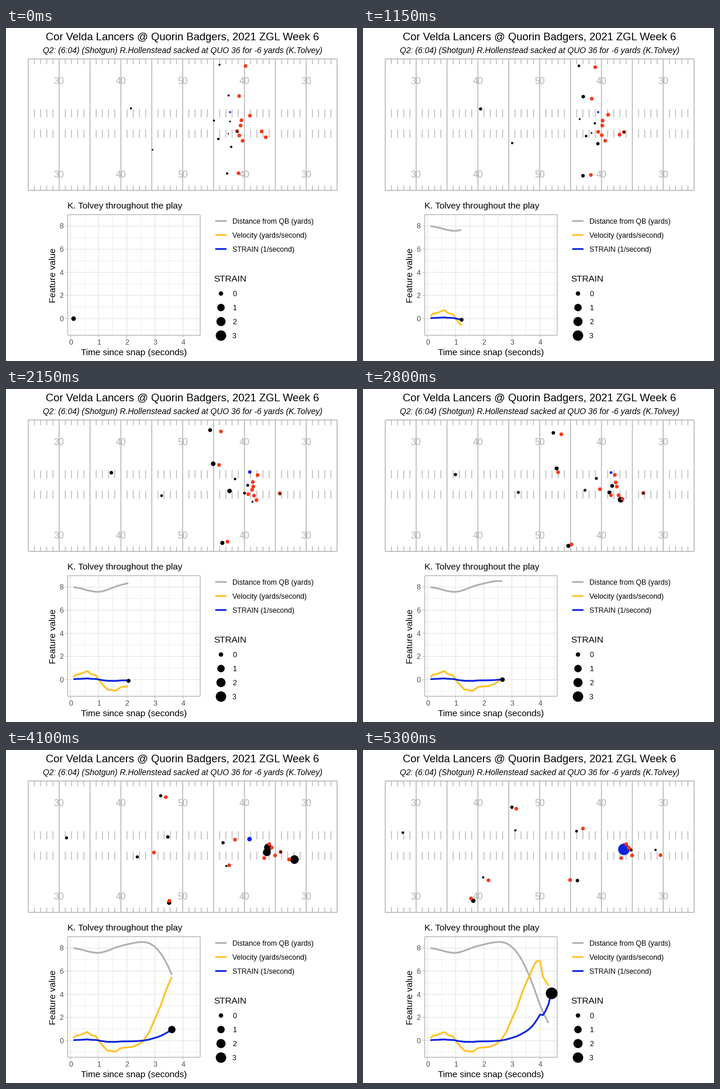
Write a matplotlib script that moves like this. It is 600 by 570 pixels and loops after 6 s.

```python
import numpy as np
import matplotlib.pyplot as plt
from matplotlib.animation import FuncAnimation

DPI, W, H = 100, 600, 570
GRAY, GOLD, BLUE, ORANGE, BALL = "#b3b3b3", "#ffc125", "#0b24dc", "#fa3616", "#2e1c14"
GRID, AXIS_TEXT = "#dedede", "#4d4d4d"
STEPS, LAST = 64, 43
FRAMES, INTERVAL = 120, 50
START, END = 0.1, 4.4

plt.rcParams["font.family"] = "Liberation Sans"

fig = plt.figure(figsize=(W / DPI, H / DPI), dpi=DPI, facecolor="white")
ax = fig.add_axes([0, 0, 1, 1])
ax.set_xlim(0, W)
ax.set_ylim(H, 0)
ax.axis("off")


def pt(px):
    return px * 72 / DPI


def area(r):
    return pt(2 * np.asarray(r, float)) ** 2


def label(x, y, s, size, ha="left", color="black", **kw):
    ax.text(x, y, s, fontsize=size, ha=ha, va="baseline", color=color, **kw)


def vlines(xs, y0, y1, px=1.48, color=GRAY):
    ax.vlines(xs, y0, y1, colors=color, lw=pt(px), zorder=1, snap=False)


def hlines(ys, x0, x1, px=1.48, color=GRAY):
    ax.hlines(ys, x0, x1, colors=color, lw=pt(px), zorder=1, snap=False)


# --- timing: 0.1 s states spread over whole steps, shown at a slowing pace ---
steps = np.arange(STEPS + 1)
ticks = np.where(steps <= 43, np.maximum((3 * steps - 1) // 2, 0), 2 * steps - 22)
times = START + 0.1 * np.arange(LAST + 1)
state_step = np.rint(np.arange(LAST + 1) * STEPS / LAST)


def play_time(frame):
    step = np.searchsorted(ticks, frame, side="right") - 1
    return float(np.interp(step, state_step, times))


# --- movement ---------------------------------------------------------------
KEYS = np.array([START, 1.2, 2.65, 4.0, END])


def route(*points):
    """Cubic Hermite curve through the points at KEYS, with a slow start."""
    p = np.array(points, float)
    m = np.gradient(p, KEYS, axis=0)
    m[0] *= 0.3

    def at(t):
        i = int(np.clip(np.searchsorted(KEYS, t) - 1, 0, len(KEYS) - 2))
        h = KEYS[i + 1] - KEYS[i]
        u = (t - KEYS[i]) / h
        s = u * u * (3 - 2 * u)
        return (p[i] + (p[i + 1] - p[i]) * s
                + h * u * (1 - u) * ((1 - u) * m[i] - u * m[i + 1]))
    return at


def cover(man, first, last, power=1):
    """Stay near a man while the gap to him closes."""
    first, last = np.array(first), np.array(last)

    def at(t):
        k = np.clip((END - t) / (END - START), 0, 1) ** power
        return man(t) - last - (first - last) * k
    return at


drift = route(0, 0.15, 0.62, 1.06, 1)


def block(first, last):
    first, last = np.array(first), np.array(last)
    return lambda t: first + (last - first) * drift(t)


wide_top = route((409.5, 65), (397, 67), (339, 77.5), (259, 87.5), (262, 100.5))
slot = route((398.5, 116.5), (391, 121), (333.5, 142.5), (227, 196.5), (214.5, 223))
wide_low = route((397.5, 248.5), (389.5, 251.5), (356.5, 266), (235, 255), (184.5, 254))
tight_end = route((417, 150), (419, 148.5), (430.5, 147), (379, 148.5), (376, 134.5))
runner = route((444, 187), (438.5, 182.5), (405, 171.5), (369, 210.5), (354, 222.5))
passer = route((437, 177), (446, 178), (479, 178), (463, 172.5), (457.5, 170.5))
left_tackle = block((402.5, 158), (450, 161))
left_guard = block((401, 167), (454, 167))
center = block((395, 176.5), (441.5, 185))
right_guard = block((399, 184), (460, 180.5))
right_tackle = route((404.5, 193), (414, 193), (443.5, 188), (498.5, 185), (508.5, 180))
offense = [wide_top, slot, wide_low, tight_end, runner, left_tackle, left_guard,
           center, right_guard, right_tackle, passer]

rusher = route((383, 144), (402, 144), (424, 143), (424, 160), (446, 170))
defense = [
    cover(wide_top, (44.5, 2), (7.5, 2.5), 2),
    cover(wide_low, (19.5, -0.5), (-4, -4)),
    cover(tight_end, (61.5, -8.5), (11, -4.5)),
    cover(runner, (81, -3), (-12.5, -1)),
    cover(left_guard, (18, 7), (6, 0), 2),
    cover(right_guard, (19, 3), (13, 6)),
    route((380.5, 115.5), (376.5, 117.5), (331, 136), (262.5, 147), (260.5, 137.5)),
    route((213.5, 137.5), (201, 138.5), (158, 146.5), (83, 148), (68, 141.5)),
    route((250.5, 208.5), (255, 197), (265.5, 177), (210.5, 196), (205.5, 218)),
    route((385, 203.5), (401.5, 198), (440.5, 189.5), (504, 182), (500, 171)),
    rusher,
]


def ball_path(t):
    snap = center(START)
    return snap + (passer(t) - snap) * min((t - START) / 0.6, 1)


def pressure(man, t, dt=0.05):
    """Speed of change of the distance to the passer, relative to it."""
    now, before = (np.hypot(*(man(s) - passer(s))) for s in (t, t - dt))
    return abs(before - now) / dt / max(now, 1)


def field_radius(v):
    return 1.13 + 8.74 * np.sqrt(min(v / 4, 1))


# --- features of the rusher -------------------------------------------------
velocity = np.interp(times, *zip(
    (0.1, 0.2), (0.2, 0.43), (0.3, 0.45), (0.6, 0.74), (0.7, 0.5), (0.9, 0.36),
    (1.1, -0.33), (1.3, -0.86), (1.6, -0.97), (1.8, -0.64), (2.2, -0.55), (2.4, -0.36),
    (2.6, 0), (2.8, 0.75), (3.2, 3.0), (3.4, 4.4), (3.8, 6.6), (3.9, 6.9), (4.0, 6.87),
    (4.1, 5.5), (4.4, 4.4)))
distance = 8 - 0.1 * (np.cumsum(velocity) - velocity[0])
strain = velocity / distance


def px(t):
    return 110.5 + 48.05 * np.asarray(t)


def py(v):
    return 497.3 - 19.78 * np.asarray(v)


def strain_radius(v):
    return 2.46 + 7.4 * np.sqrt(max(v + 0.13, 0) / 4.1)


# --- field ------------------------------------------------------------------
label(301.5, 21.3, "Cor Velda Lancers @ Quorin Badgers, 2021 ZGL Week 6", 13.2, "center")
label(302, 43, "Q2: (6:04) (Shotgun) R.Hollenstead sacked at QUO 36 for -6 yards (K.Tolvey)",
      10, "center", style="italic")

LEFT, RIGHT, TOP, BOTTOM = 38, 566, 53, 278
yards = np.linspace(LEFT, RIGHT, 51)
inner = [x for i, x in enumerate(yards) if i % 5]
for y0, y1 in [(TOP, 62), (139, 153), (174, 188), (269.5, BOTTOM)]:
    vlines(inner, y0, y1, 1.3)
vlines(yards[::5], TOP, BOTTOM)
hlines([TOP, BOTTOM], LEFT, RIGHT)
for x, yard in zip(yards[5::10], (30, 40, 50, 40, 30)):
    for y in (96.2, 256.5):
        label(x, y, yard, 11.4, "center", GRAY)

# --- feature chart ----------------------------------------------------------
X0, X1, Y0, Y1 = 105.5, 332, 319.5, 526
vlines(px(np.arange(0.5, 5)), Y0, Y1, 0.5, GRID)
hlines(py(np.arange(-1, 8, 2)), X0, X1, 0.5, GRID)
vlines(px(np.arange(5)), Y0, Y1, 0.9, GRID)
hlines(py(np.arange(0, 9, 2)), X0, X1, 0.9, GRID)
vlines([X0, X1], Y0, Y1, 1.3)
hlines([Y0, Y1], X0, X1, 1.3)
for i in range(5):
    vlines([px(i)], Y1, Y1 + 3.8, 0.9)
    label(px(i), 542.3, i, 8.8, "center", AXIS_TEXT)
    hlines([py(2 * i)], X0 - 3.8, X0, 0.9)
    label(98.3, py(2 * i) + 4.4, 2 * i, 8.8, "right", AXIS_TEXT)
label(105, 309, "K. Tolvey throughout the play", 11)
label(218.2, 560, "Time since snap (seconds)", 11, "center")
label(85, 422.7, "Feature value", 11, "center", rotation=90, rotation_mode="anchor")

# --- legends ----------------------------------------------------------------
series = [("Distance from QB (yards)", "#b0b0b0", distance[:-1]),
          ("Velocity (yards/second)", GOLD, velocity[:-1]),
          ("STRAIN (1/second)", BLUE, strain)]
curves = []
for i, (name, color, values) in enumerate(series):
    y = 330.3 + 24 * i
    style = dict(color=color, lw=pt(2.96), snap=False,
                 solid_capstyle="butt", solid_joinstyle="round")
    ax.plot([357.7, 376.9], [y, y], **style)
    label(387, y + 4.6, name, 8.8)
    curves.append((ax.plot([], [], zorder=3, **style)[0], values))

label(355, 434, "STRAIN", 11)
for i in range(4):
    y = 454.4 + 24 * i
    ax.scatter(367.3, y, s=area(strain_radius(i)), c="black", lw=0)
    label(387, y + 4.6, i, 8.8)


# --- moving marks -----------------------------------------------------------
def dots(color, n=1, r=3.2, z=5, **kw):
    return ax.scatter(np.zeros(n), np.zeros(n), s=area(np.full(n, r)),
                      c=color, lw=0, zorder=z, **kw)


defenders = dots(["black"] * (len(defense) - 1) + [BLUE], len(defense))
attackers = dots(ORANGE, len(offense), z=6)
ball = dots(BALL, r=2.5, z=7, alpha=0.8)
marker = dots("black", z=8)


def draw(frame):
    t = play_time(frame)
    defenders.set_offsets([man(t) for man in defense])
    defenders.set_sizes(area([field_radius(pressure(man, t)) for man in defense]))
    attackers.set_offsets([man(t) for man in offense])
    ball.set_offsets([ball_path(t)])

    for line, values in curves:
        ts = times[:len(values)]
        end = min(t, ts[-1])
        shown = ts < end
        line.set_data(px(np.append(ts[shown], end)),
                      py(np.append(values[shown], np.interp(end, ts, values))))

    s = np.interp(t, times, strain)
    marker.set_offsets([(px(t), py(s))])
    marker.set_sizes([area(strain_radius(s))])
    return defenders, attackers, ball, marker


anim = FuncAnimation(fig, draw, frames=FRAMES, interval=INTERVAL, repeat=True,
                     repeat_delay=0, blit=False)
plt.show()
```
